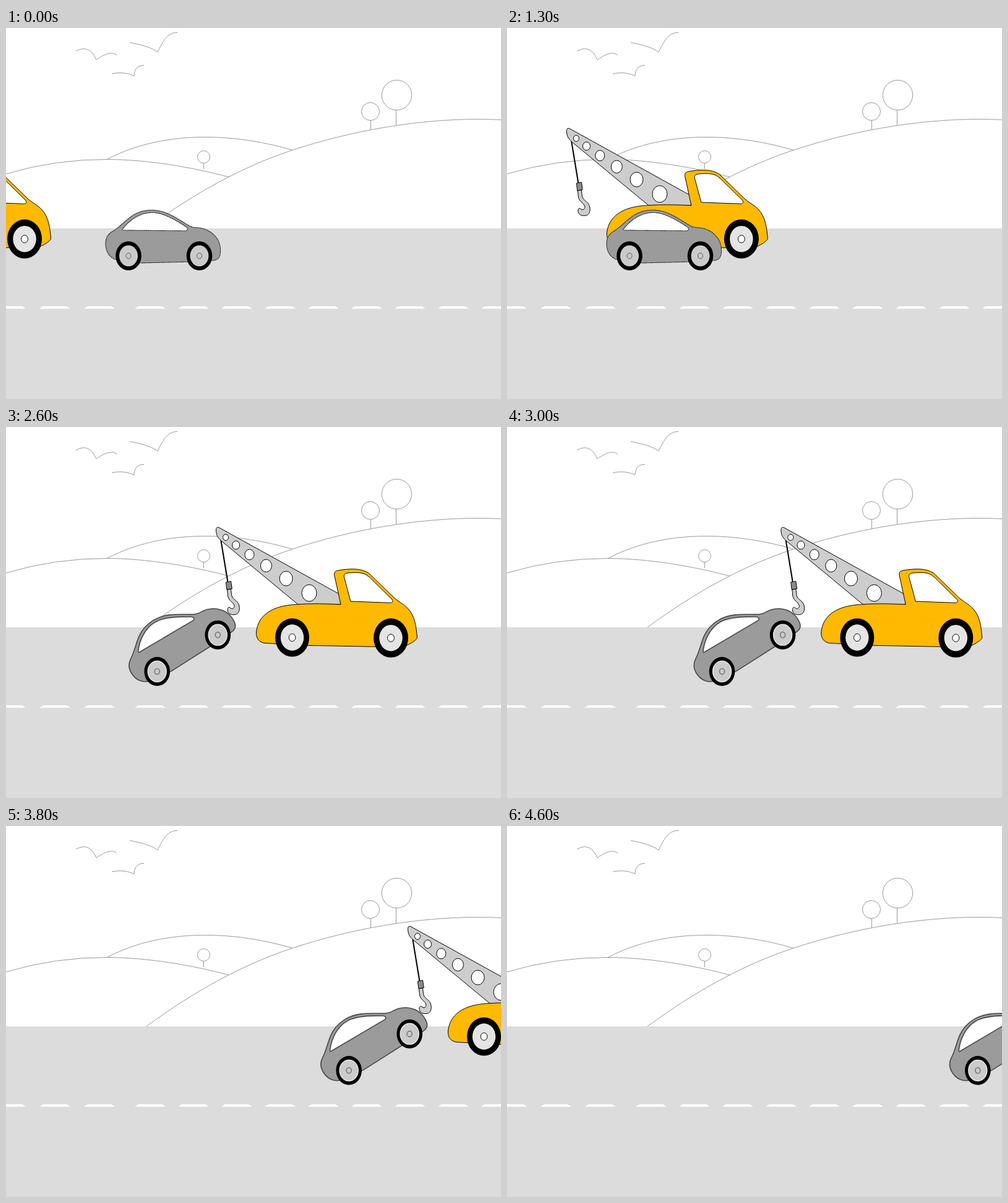
These frames come from a looping animation (800x600 px, 4.7 s). An HTML page:

```html
<!DOCTYPE html>
<html lang="en">
<head>
<meta charset="utf-8">
<title>Tow truck</title>
<style>
  html, body { margin: 0; width: 100%; height: 100%; overflow: hidden; background: #fff; }
  svg { display: block; width: 800px; height: 600px; overflow: hidden; }
  .scenery { fill: none; stroke: #999; stroke-width: 1; }
  .truck { stroke: #000; stroke-width: 1; }
  .steel { fill: #cdcdcd; }
  .paint { fill: #ffba00; }
  .glass { fill: #fff; }
  .car .shell { fill: #9b9b9b; }
  .car .line { stroke: #1c1c1c; stroke-width: 1.1; stroke-dasharray: 2.2 .6; }
  .car .rim { fill: #cbcbcb; stroke: none; }
  .car .hub { fill: #cbcbcb; stroke: #555; stroke-width: 1; }
  .car.lifted .line { stroke: #484848; stroke-width: 1.6; stroke-dasharray: none; }
  .car.lifted .rim { stroke: #e6e6e6; stroke-width: 1.5; }
  .car.lifted .hub { stroke: #777; stroke-width: 1.6; }
  .truck .rim { fill: #e4e4e4; stroke: none; }
  .truck .hub { fill: #fff; }
  .tyre { fill: #000; stroke: none; }
</style>
</head>
<body>
<svg viewBox="0 0 800 600">
  <g class="scenery">
    <path d="M113,37.5C125,31 137,31 146,51.5C155,45 170,36 179,44"/>
    <path d="M200,23.5C218,27 235,31 245,39C252,25 260,6.5 277,7.5"/>
    <path d="M171,74C185,71 198,73 207,77.5C207,68 212,60 223,60.5"/>
    <path d="M0,236Q80,212 165,212.5C230,213 300,225 360,241"/>
    <path d="M164,212C210,188 265,176 326,176.5C375,177 420,185 463,197.5"/>
    <path d="M227,324C306,266 384,223.5 463,197.5C560,165.5 665,147.5 765,147.5Q783,147.5 800,148.5"/>
    <circle cx="589" cy="135" r="14.5"/><path d="M589.5,149.5V164"/>
    <circle cx="631.5" cy="108.5" r="24.2"/><path d="M630.5,132.5V157.5"/>
    <circle cx="319.5" cy="208.5" r="10"/><path d="M319.5,218.5V228"/>
  </g>
  <rect y="324" width="800" height="276" fill="#dcdcdc"/>
  <path id="dashes" fill="#fff"/>

  <g id="truck" class="truck">
    <path d="M238.3,183L249.3,250" stroke-width="2"/>
    <path class="steel" d="M248.5,263L249.5,273C250.5,281 258.5,283 260,289C260.5,293 256.5,295 254,293C251.5,290 248.5,292 249,296C249.5,302 255,304 260,303.5C267,303 269,297 268,290C266.500,280 256.500,280 255.500,271L254.500,262Z"/>
    <path fill="#8a8a8a" d="M246.5,251L254.500,249.500L256.300,261.500L247.800,263Z"/>
    <path class="steel" d="M432,271.500L235,162.500C230,161 230,166 231,171C231.500,177 236,181.500 240,185L363,287H432Z"/>
    <g id="holes"></g>
    <path class="paint" d="M432,287L422,241C420,233 425,232 434,231C450,229 464,228.500 477,236L516,274C525,283 534,286 541,294C552,306 554,323 555.500,341C553,346 545,350 539,353L500,355.500L380,353.300L309,349.500C300,348 295,342 295.500,332C298,305 320,289 360,287C385,285 410,286 432,287Z"/>
    <path class="glass" d="M448,282L437.500,243C436.500,238 439,236.500 445,236C457,235 467,235 474,239.500Q479,243 484,248.500L515,279C517,283 515,284.500 511,284.300Z"/>
  </g>

  <g id="car" class="car">
    <path class="shell line" d="M161,349C161,340 164,334 172,329C181,324 190,314 202,305C213,297 224,294.500 236,294.500C256,294.500 272,305 288,315C296,320 300,322.500 307,322.800C328,323 346,338 346.500,358C347,371 343,376 332,376L300,378L218,380L180,375C168,373 161,362 161,349Z"/>
    <path class="glass line" d="M188.500,325C200,310 218,298 237,298.500C255,299 275,311 291,321.500C295,325 293,328 290,328L190,327Q187,327 188.500,325Z"/>
  </g>
</svg>
<script>
  const byId = id => document.getElementById(id);
  const truck = byId('truck'), car = byId('car');
  const TALL = 1.13;                  // every round part is a little taller than wide

  function add(parent, tag, attrs) {
    const el = document.createElementNS('http://www.w3.org/2000/svg', tag);
    for (const name in attrs) el.setAttribute(name, attrs[name]);
    return parent.appendChild(el);
  }

  const oval = (parent, cx, cy, r, cls) =>
    add(parent, 'ellipse', { cx, cy, rx: r, ry: r * TALL, class: cls });

  function wheel(parent, x, y, r, rim) {
    const group = add(parent, 'g', { transform: `translate(${x} ${y})` });
    oval(group, 0, 0, r, 'tyre');
    oval(group, 0, 0, r * rim, 'rim');
    oval(group, 0, 0, r * 0.195, 'hub');
    return { group, x, y };
  }

  // holes grow and spread towards the foot of the boom
  for (let i = 0; i < 6; i++) {
    oval(byId('holes'), 246 + 14 * i + 2.6 * i * i, 178.5 + 11.2 * i + 1.36 * i * i,
      4.5 + 1.5 * i, 'glass');
  }

  const dashRun = (start, gap, count) => Array.from({ length: count },
    (_, i) => `M${start + gap * i},454l6,-4h38l6,4z`).join('');
  byId('dashes').setAttribute('d', dashRun(-18, 72, 3) + dashRun(208, 70, 9));

  wheel(truck, 353.5, 340.5, 27.5, 0.68);
  wheel(truck, 513, 341.2, 28, 0.67);
  const carWheels = [198, 312.5].map(x => wheel(car, x, 368.5, 20.8, 0.72));

  const TICK = 100, TICKS = 47;
  const PARK = 18;                    // tick at which the truck has no offset
  const LIFT = 21, LIFTED = 24, TOW = 25;
  const HITCH_X = 83.2, DRIVE_SPEED = 26.83, TOW_SPEED = 25.83;

  function draw(now) {
    const k = Math.floor(now / TICK) % TICKS;
    const tow = Math.max(0, k - TOW) * TOW_SPEED;
    const lift = Math.min(1, Math.max(0, (k - LIFT) / (LIFTED - LIFT)));
    const truckX = k <= LIFT ? (k - PARK) * DRIVE_SPEED : HITCH_X + tow;
    const tilt = 31.1 * lift;

    truck.setAttribute('transform', `translate(${truckX})`);
    car.setAttribute('transform',
      `translate(${12.2 * lift + tow} ${-2.6 * lift}) rotate(${-tilt} 255 368.5)`);
    // the wheels stay upright while the body tilts
    for (const { group, x, y } of carWheels) {
      group.setAttribute('transform', `translate(${x} ${y}) rotate(${tilt})`);
    }
    car.classList.toggle('lifted', lift > 0);
  }

  function loop() {
    draw(performance.now());
    requestAnimationFrame(loop);
  }
  loop();
</script>
</body>
</html>
```
